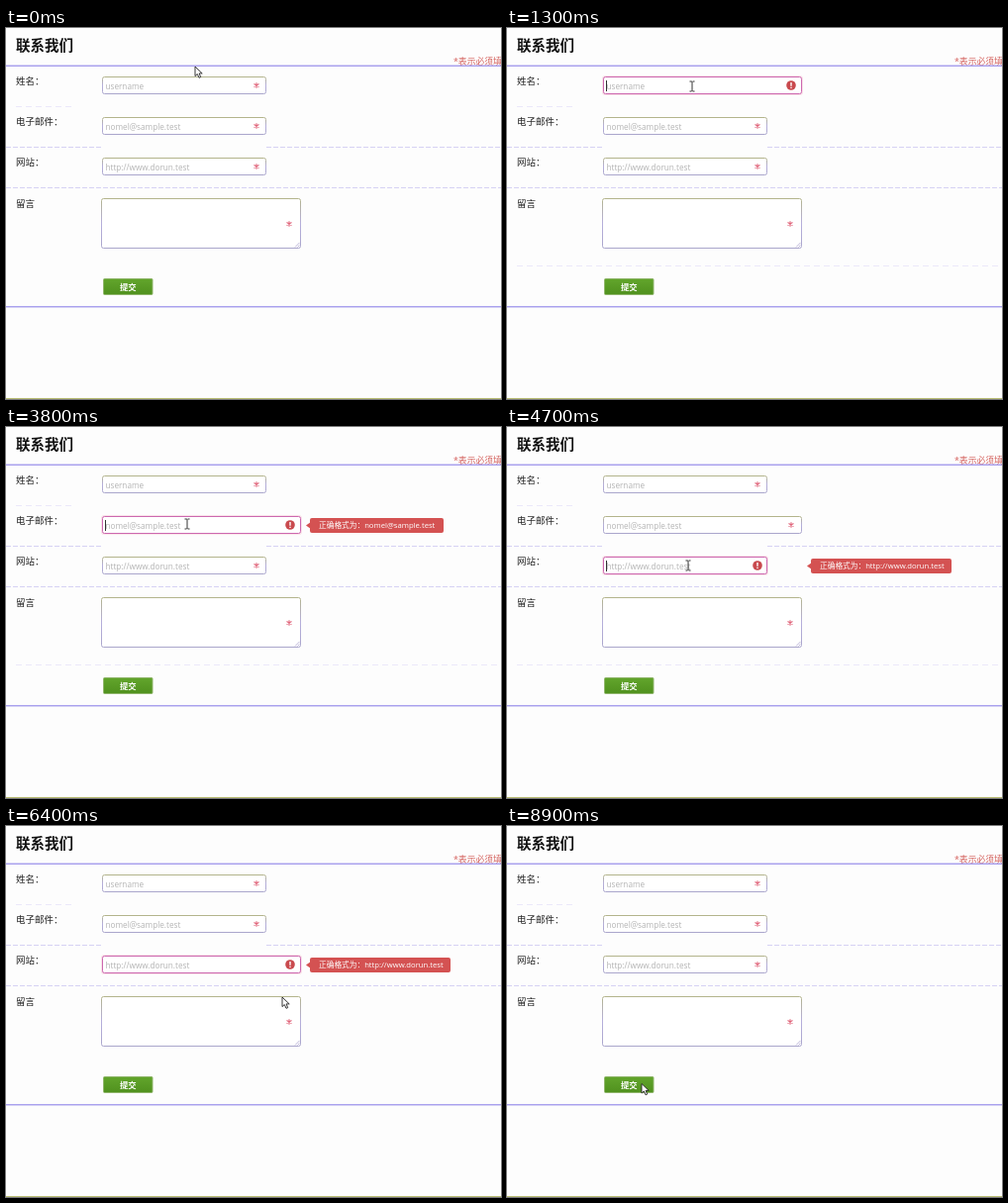
These frames come from a looping animation (500 px wide and 375 px high, 9 s). An HTML page:

```html
<!DOCTYPE html>
<html lang="zh-CN">
<head>
<meta charset="utf-8">
<title>联系我们</title>
<style>
  html, body { margin: 0; width: 100%; height: 100%; overflow: hidden; background: #fdfdfd; }
  svg { display: block; width: 500px; height: 375px; }
  text { font-family: "Open Sans", "Noto Sans CJK SC", "Noto Sans CJK", "Noto Sans CJK JP", sans-serif; }
  .title { font-size: 14.5px; font-weight: 700; fill: #111; }
  .label { font-size: 9.5px; fill: #222; }
  .note { font-size: 8.8px; fill: #d4605c; }
  .hint { font-size: 8.2px; fill: #b4b4b4; }
  .tip text { font-size: 7.7px; fill: #fff; }
  .tip rect, .tip path { fill: #d45252; }
  .rule { stroke: #aaa2ee; stroke-width: 1.5; }
  .row { stroke: #d6d2f4; stroke-dasharray: 5 2; }
  .faint { stroke: #ebe8fa; stroke-dasharray: 6 4; }
  .box { fill: #fff; stroke: url(#edge); }
  .glow { fill: none; stroke: #e87a9c; stroke-width: 3; opacity: 0; }
  .star { stroke: #e0647a; stroke-width: 1.1; }
  .alert circle { fill: #c94a4e; }
  .alert path { stroke: #fff; stroke-width: 1.4; }
  .caret { stroke: #333; }
  .on .box { stroke: #cc68b0; }
  .on .glow { opacity: .22; }
  .on .star, .alert, .tip { display: none; }
  .on .alert, .on .tip { display: inline; }
  .grip { stroke: #aaa2cc; stroke-width: .8; fill: none; }
</style>
</head>
<body>
<svg viewBox="0 0 500 375">
  <defs>
    <linearGradient id="edge" x2="0" y2="1">
      <stop offset="0" stop-color="#b3b48c"/>
      <stop offset=".5" stop-color="#b5aedc"/>
      <stop offset="1" stop-color="#aaa6cc"/>
    </linearGradient>
    <linearGradient id="green" x2="0" y2="1">
      <stop offset="0" stop-color="#62a52c"/>
      <stop offset="1" stop-color="#50911e"/>
    </linearGradient>
  </defs>

  <text class="title" x="10" y="23.3">联系我们</text>
  <text class="note" x="452" y="36.5">*表示必须填写</text>
  <path class="rule" d="M0 38.3H500M0 281.8H500"/>
  <path class="row" d="M0 120.5H97M263 120.5H500M0 161.5H500"/>
  <path class="faint" d="M10 79.5H70"/>
  <path class="faint" id="lastRow" d="M10 240.5H500"/>
  <path d="M0 374.5H500" stroke="#b9be74"/>

  <g id="form"></g>

  <rect x="98.5" y="253.5" width="49.5" height="16" rx="1" fill="url(#green)" stroke="#8fb56a"/>
  <text x="115" y="264.8" font-size="8.4" font-weight="700" fill="#fff">提交</text>

  <path id="arrow" d="M0 0V9.6L2.3 7.5L4 11.3L5.7 10.6L4.1 6.9H7.2Z" fill="#fff" stroke="#222" stroke-width=".9"/>
  <path id="beam" d="M-2.5 -5H-.6L0 -4.4L.6 -5H2.5M0 -4.4V4.4M-2.5 5H-.6L0 4.4L.6 5H2.5" fill="none" stroke="#333"/>
</svg>
<script>
const LOOP = 9000, STEP = 100, GROW = 35, EASE_MS = 250, BLINK = 500;
const tipLead = '正确格式为：';
const mail = 'nomel@sample.test', site = 'http://www.dorun.test';

// from / to: when the field gains and loses focus
const fields = [
  { label: '姓名：', hint: 'username', x: 97, y: 49, w: 166, h: 18, from: 900, to: 2800 },
  { label: '电子邮件：', hint: mail, x: 97, y: 90, w: 166, h: 18, from: 2800, to: 4700, tip: mail, tipW: 135 },
  { label: '网站：', hint: site, x: 97, y: 131, w: 166, h: 18, from: 4700, to: 6900, tip: site, tipW: 142 },
  { label: '留言', hint: '', x: 96, y: 172, w: 202, h: 51, from: 6900, to: 8500, area: true }
];

// pointer stops: time, x, y
const stops = [
  [0, 191, 39], [200, 191, 39], [700, 187, 59], [1700, 187, 59], [2200, 183, 98],
  [4000, 183, 98], [4500, 183, 140], [5800, 183, 140], [6400, 279, 173],
  [6700, 255, 195], [7500, 255, 195], [8300, 136, 260.5], [9000, 136, 260.5]
];

const $ = id => document.getElementById(id);

function tipMarkup(f) {
  if (!f.tip) return '';
  return `<g class="tip"><path d="M303 ${f.y + 9.5}l5 -3.5v7z"/>
    <rect x="307" y="${f.y + 2}" width="${f.tipW}" height="15" rx="2"/>
    <text x="316" y="${f.y + 12.3}">${tipLead}${f.tip}</text></g>`;
}

function fieldMarkup(f) {
  const rect = c => `<rect class="${c}" x="${f.x + .5}" y="${f.y + .5}" width="${f.w - 1}" height="${f.h - 1}" rx="2"/>`;
  const caretY = f.area ? f.y + 5 : f.y + 4;
  return `<g><text class="label" x="10" y="${f.area ? 181 : f.y + 8}">${f.label}</text>
    ${rect('glow')}${rect('box')}
    <text class="hint" x="100.5" y="${f.y + 12.5}">${f.hint}</text>
    <path class="caret" d="M100.5 ${caretY}v11"/>
    <g class="icon">
      <path class="star" d="M0 -2.8V2.8M-2.5 -1.4L2.5 1.4M-2.5 1.4L2.5 -1.4"/>
      <g class="alert"><circle r="4.8"/><path d="M0 -2.9V.8M0 1.7V3"/></g>
    </g>
    ${f.area ? '<path class="grip" d="M-6 -1.5L-1.5 -6M-3.5 -1.5L-1.5 -3.5"/>' : ''}
    ${tipMarkup(f)}</g>`;
}

$('form').innerHTML = fields.map(fieldMarkup).join('');
fields.forEach((f, i) => {
  f.node = $('form').children[i];
  f.rects = f.node.querySelectorAll('.glow, .box');
  f.icon = f.node.querySelector('.icon');
  f.caret = f.node.querySelector('.caret');
  f.grip = f.node.querySelector('.grip');
});

const clamp = v => Math.max(0, Math.min(1, v));
const easeOut = p => 1 - (1 - p) ** 2.4;
const smooth = p => p * p * (3 - 2 * p);
const place = (node, x, y) => node.setAttribute('transform', `translate(${x} ${y})`);
const show = (node, on) => { node.style.display = on ? '' : 'none'; };

function drawField(f, t) {
  const focused = t >= f.from && t < f.to;
  const open = easeOut(clamp((t - f.from) / EASE_MS)) - easeOut(clamp((t - f.to) / EASE_MS));
  const w = f.w + GROW * open;
  f.node.setAttribute('class', focused ? 'on' : '');
  f.rects.forEach(r => r.setAttribute('width', w - 1));
  place(f.icon, f.x + w - (f.area ? 12 : 10) - open, f.y + f.h / 2 + (f.area ? .5 : 0));
  show(f.caret, focused && (t - f.from) % (2 * BLINK) < BLINK);
  if (f.grip) place(f.grip, f.x + w, f.y + f.h);
}

function drawPointer(t) {
  const i = stops.findIndex(s => s[0] > t);
  const [t0, x0, y0] = stops[i - 1], [t1, x1, y1] = stops[i];
  const p = smooth((t - t0) / (t1 - t0));
  const x = x0 + (x1 - x0) * p, y = y0 + (y1 - y0) * p;
  const typing = fields.some(f => x > f.x && x < f.x + f.w && y > f.y + 1.5 && y < f.y + f.h - 1);
  show($('arrow'), !typing);
  show($('beam'), typing);
  place($(typing ? 'beam' : 'arrow'), x, y);
}

function draw(now) {
  const t = Math.floor((now % LOOP) / STEP) * STEP;
  fields.forEach(f => drawField(f, t));
  show($('lastRow'), t >= 1000 && t < 6000);
  drawPointer(t);
}

const start = performance.now();
function tick() {
  draw(performance.now() - start);
  requestAnimationFrame(tick);
}
tick();
</script>
</body>
</html>
```
